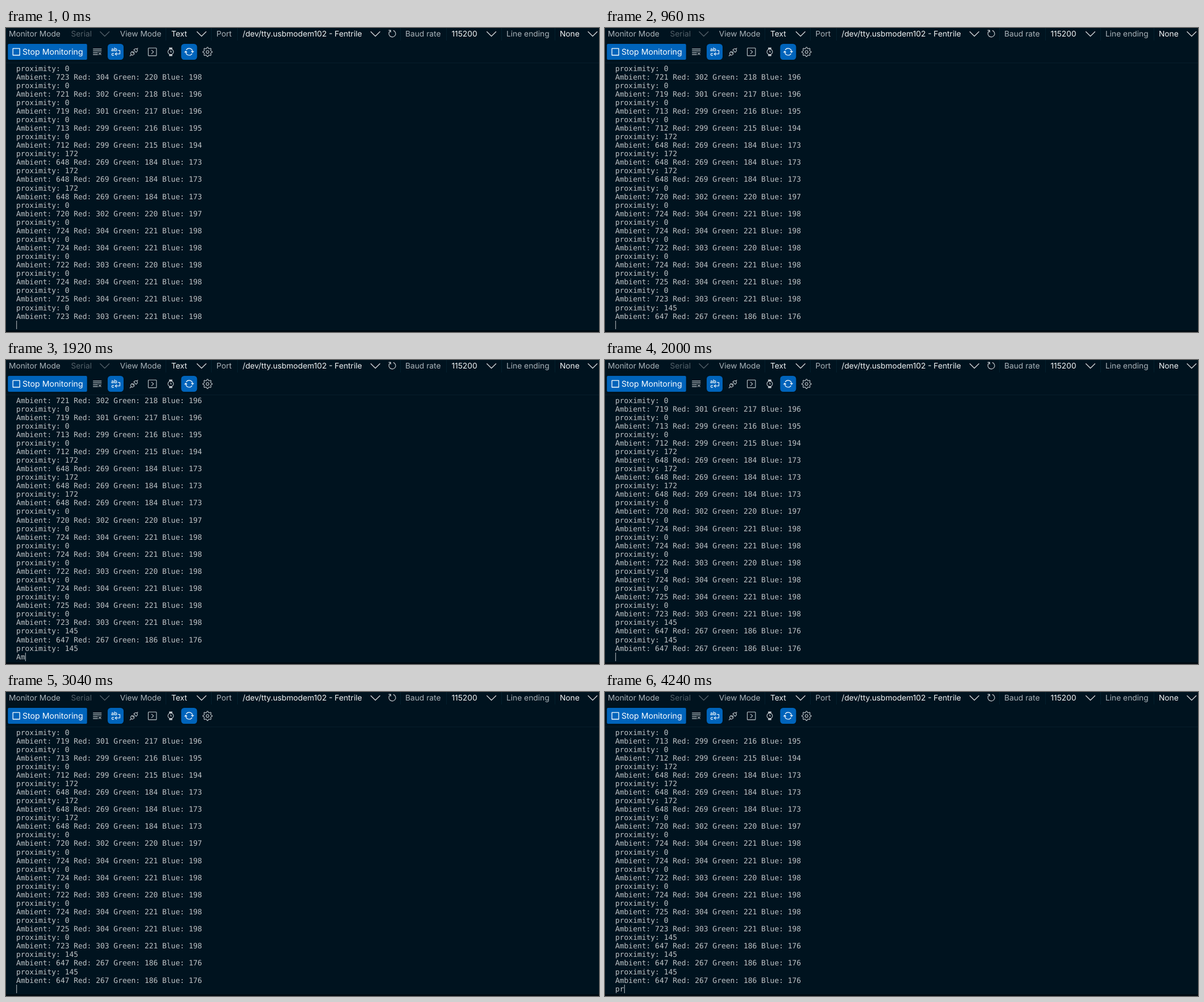
An HTML page for the animation above (4.32 s loop, 1044 px wide and 536 px high).

```html
<!DOCTYPE html>
<html lang="en">
<head>
<meta charset="utf-8">
<title>Serial monitor</title>
<style>
  html, body { margin: 0; width: 100%; height: 100%; overflow: hidden; background: #00131f; }
  svg { display: block; width: 100vw; height: 100vh; }
  text { text-rendering: geometricPrecision; }
  .bar { font: 13.75px Inter, Roboto, sans-serif; fill: #acb5bb; }
  .bar .value { fill: #f4f6f7; }
  .bar .off { fill: #53616a; }
  .line { fill: none; stroke: #c3c9cd; stroke-width: 1.1; stroke-linejoin: round; }
  .white { stroke: #fff; }
  .arrow { stroke: #d5d9dc; stroke-width: 1.3; }
  .arrow.off { stroke: #53616a; }
  .blue { fill: #0064bb; }
  #log { font: 12.95px "DejaVu Sans Mono", "Liberation Mono", monospace; fill: #bfc4c7; }
</style>
</head>
<body>
<svg viewBox="0 0 1044 536">
  <rect width="1044" height="536" fill="#00131f"/>
  <path d="M0 61.5H1044" stroke="#061d2a"/>
  <path d="M281.5 0V22M361.5 0V22M407.5 0V22M694.5 0V22M775.5 0V22M872.5 0V22M966.5 0V22" stroke="#04202d"/>
  <rect y="533" width="1044" height="3" fill="#000a11"/>

  <g class="bar">
    <text x="5" y="15">Monitor Mode</text>
    <text x="114.5" y="15" class="off">Serial</text>
    <text x="200.7" y="15">View Mode</text>
    <text x="291" y="15" class="value">Text</text>
    <text x="370.5" y="15">Port</text>
    <text x="416.5" y="15" class="value">/dev/tty.usbmodem102 - Fentrile</text>
    <text x="703" y="15">Baud rate</text>
    <text x="784.5" y="15" class="value">115200</text>
    <text x="881" y="15">Line ending</text>
    <text x="975" y="15" class="value">None</text>
  </g>
  <g id="arrows"></g>

  <g class="blue">
    <rect x="3.3" y="28" width="139.4" height="28" rx="2"/>
    <rect x="179" y="28" width="28" height="28" rx="5.4"/>
    <rect x="308.4" y="28" width="28" height="28" rx="5.4"/>
  </g>
  <rect class="line white" style="stroke-width:1.3" x="12.2" y="36.2" width="12" height="11.8"/>
  <text x="29" y="47.3" style="font:14.15px Inter,Roboto,sans-serif" fill="#fff">Stop Monitoring</text>

  <!-- refresh -->
  <path class="line" transform="translate(671.4 1.4) scale(1.077)" d="M2 2.5H5.5V6M5 3.4A5.5 5.5 0 1 0 9.7 2.76"/>
  <!-- clear -->
  <path class="line" transform="translate(152.1 33.4) scale(1.077)" d="M1 3.5H15M1 6.5H15M1 9.5H9M1 12.5H9M10.3 9L14.3 13M14.3 9L10.3 13"/>
  <!-- word wrap -->
  <g style="font:600 9px Inter,Roboto,sans-serif" fill="#fff">
    <text x="185" y="41">ab</text>
    <text x="185.5" y="48.5">c</text>
  </g>
  <path class="line white" d="M197 39.5H200.5V45.8H192.5M195 43.2L192.3 45.8L195 48.4"/>
  <!-- plug -->
  <path class="line" d="M218 49.5L220.7 46.8M221.8 41.5L226 45.7L224 47.4A2.9 2.9 0 0 1 220 43.4ZM223.3 43L225 41.3M224.7 44.4L226.4 42.7M225 38.7L229.2 42.9L231 41A2.9 2.9 0 0 0 227 37ZM230.2 37.4L232.3 35.3"/>
  <!-- terminal -->
  <rect class="line" x="250.5" y="35.3" width="14.4" height="13.6" rx="1"/>
  <path class="line" d="M256 38.8L259.8 42.2L256 45.6"/>
  <!-- watch -->
  <circle class="line" cx="290" cy="42" r="4.9"/>
  <path d="M287.2 37.4V34.5H292.8V37.4ZM287.2 46.6V49.5H292.8V46.6Z" fill="#c3c9cd"/>
  <path class="line" d="M290 39.4V42.3H292"/>
  <!-- sync -->
  <path class="line white" transform="translate(313.8 33.4) scale(1.077)" d="M.4 9.1L2.5 7L4.6 9.1M2.5 8A5.5 5.5 0 0 0 12.8 10.7M11.4 6.9L13.5 9L15.6 6.9M13.5 8A5.5 5.5 0 0 0 3.2 5.2"/>
  <!-- settings -->
  <path id="gear" class="line"/>
  <circle class="line" cx="354.8" cy="42.2" r="2.4"/>

  <g id="log"></g>
  <rect id="cursor" y="516" width="1" height="15" fill="#bfc4c7"/>
</svg>
<script>
const $ = id => document.getElementById(id);
const NS = "http://www.w3.org/2000/svg";
const LOOP = 4320, ROWS = 31, ROW = 15.07, COL = 7.8, LEFT = 18;

$("arrows").innerHTML = [165.5, 336, 642, 846.3, 1024.5].map((x, i) =>
  `<path class="line arrow ${i ? "" : "off"}" d="M${x} 6.3l8.3 8.2l8.3-8.2"/>`).join("");

$("gear").setAttribute("d", "M" + Array.from({ length: 32 }, (_, i) => {
  const r = i % 4 < 2 ? 8.2 : 6.2, a = (i - 0.5) * Math.PI / 16;
  return [354.8 + r * Math.cos(a), 42.2 + r * Math.sin(a)].map(v => v.toFixed(2));
}).join("L") + "Z");

// proximity, ambient, red, green, blue
const lines = `0 723 304 220 198
0 721 302 218 196
0 719 301 217 196
0 713 299 216 195
0 712 299 215 194
172 648 269 184 173
172 648 269 184 173
172 648 269 184 173
0 720 302 220 197
0 724 304 221 198
0 724 304 221 198
0 722 303 220 198
0 724 304 221 198
0 725 304 221 198
0 723 303 221 198
145 647 267 186 176
145 647 267 186 176
145 647 267 186 176`.split("\n").flatMap(row => {
  const [p, a, r, g, b] = row.split(" ");
  return [`proximity: ${p}`, `Ambient: ${a} Red: ${r} Green: ${g} Blue: ${b}`];
});

// start time, finished lines, unfinished line
const steps = [
  [0, 30, ""],
  [560, 30, "pr"], [640, 31, ""], [720, 31, "Am"], [800, 32, ""],
  [1760, 32, "pr"], [1840, 33, ""], [1920, 33, "Am"], [2000, 34, ""],
  [3200, 36, ""], [4240, 36, "pr"]
];

const rows = Array.from({ length: ROWS }, (_, i) => {
  const t = document.createElementNS(NS, "text");
  t.setAttribute("x", LEFT);
  t.setAttribute("y", 75.55 + i * ROW);
  return $("log").appendChild(t);
});

let shown;
function draw(now) {
  const time = now % LOOP;
  const step = steps.findLast(s => s[0] <= time);
  if (step !== shown) {
    shown = step;
    const [, done, tail] = step;
    const view = [...lines.slice(done - ROWS + 1, done), tail];
    rows.forEach((t, i) => t.textContent = view[i]);
    $("cursor").setAttribute("x", LEFT + 0.2 + COL * tail.length);
  }
}

function tick() {
  draw(performance.now());
  requestAnimationFrame(tick);
}
tick();
</script>
</body>
</html>
```
